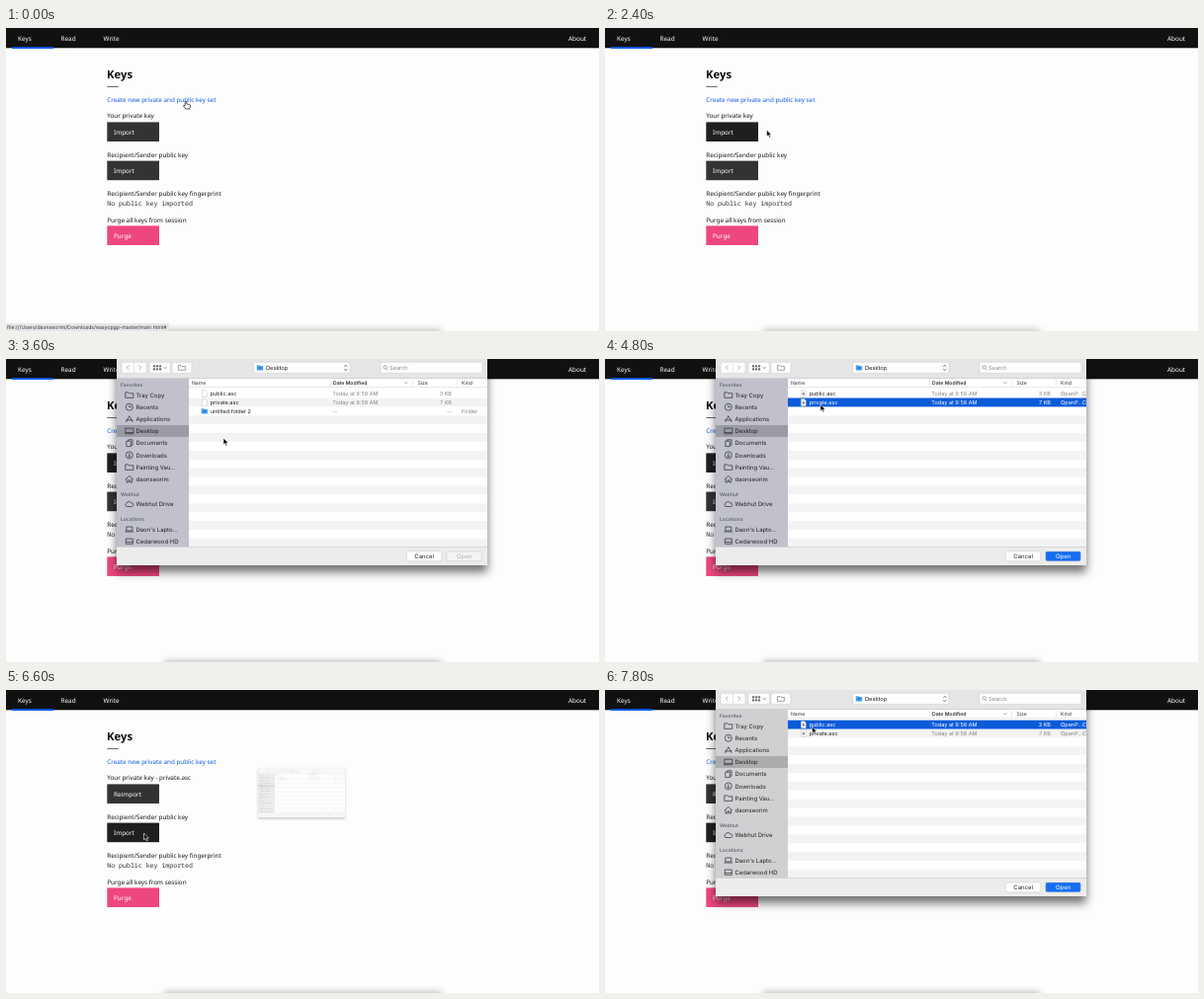
Recreate the animation shown at these times as an HTML page. Size 600 by 307 pixels, loop 8000 ms.

```html
<!DOCTYPE html>
<html lang="en">
<head>
<meta charset="utf-8">
<title>Key import</title>
<style>
html, body { margin: 0; width: 100%; height: 100%; overflow: hidden; background: #fdfdfd; }
svg { display: block; width: 100%; height: 100%; text-rendering: geometricPrecision; }
.page { font: 6.3px "Noto Sans", "Open Sans", sans-serif; }
.ui { font: 5.55px Inter, Roboto, sans-serif; }
.shadow { filter: drop-shadow(0 7px 5px rgba(0, 0, 0, .55)); }
</style>
</head>
<body>
<svg id="stage" viewBox="0 0 600 307"></svg>
<script>
const LOOP = 8000, STEP = 200;
const stage = document.getElementById('stage');
const BLUE = '#0b5bd9', INK = '#3c3d44';

const rect = (x, y, w, h, fill, extra = '') =>
  `<rect x="${x}" y="${y}" width="${w}" height="${h}" fill="${fill}" ${extra}/>`;
const text = (x, y, s, fill = '#161616', extra = '') =>
  `<text x="${x}" y="${y}" fill="${fill}" ${extra}>${s}</text>`;
const line = (d, stroke, width = .7, extra = '') =>
  `<path d="${d}" fill="none" stroke="${stroke}" stroke-width="${width}" ${extra}/>`;
const shape = (d, fill, extra = '') => `<path d="${d}" fill="${fill}" ${extra}/>`;
const at = (x, y, s) => `<g transform="translate(${x} ${y})">${s}</g>`;
const size = n => `font-size="${n}"`;

// Pointer path: time, x, y
const path = [
  [0, 182, 74], [1000, 182, 74], [1400, 152, 102], [1600, 167, 103], [2200, 167, 103],
  [3200, 150, 104], [3400, 216.5, 93], [3600, 220, 80], [4400, 218, 46], [5200, 218, 46],
  [5600, 185, 90], [6000, 139.5, 145], [6600, 139.5, 145], [7600, 209.5, 37], [LOOP, 209.5, 37]
];

function pointerAt(t) {
  const i = path.findIndex(p => p[0] > t);
  const [a, b] = [path[i - 1], path[i]];
  const k = (t - a[0]) / (b[0] - a[0]);
  return [a[1] + (b[1] - a[1]) * k, a[2] + (b[2] - a[2]) * k];
}

function pointer(t) {
  const hand = 'M-.8 .6Q0-.3 .7 .6V3L3.8 3.5Q4.7 3.8 4.5 5L3.8 8H-.2L-2.6 5Q-2.6 4-.8 4.8Z';
  const arrow = 'M0 0V6.8L1.6 5.4L2.7 7.9L3.9 7.4L2.8 5H4.9Z';
  return at(...pointerAt(t), t < 1200
    ? shape(hand, '#fff', 'stroke="#111" stroke-width=".7"')
    : shape(arrow, '#000', 'stroke="#fff" stroke-width=".6"'));
}

const button = (y, label, fill) =>
  rect(102.3, y, 52.7, 19.6, fill) + text(109, y + 12.4, label, '#fff', size(6.4));

function page(t) {
  const loaded = t >= 5600;
  const first = t >= 1400 && !loaded ? '#1f1f1f' : '#333';
  const second = t >= 6000 ? '#1f1f1f' : '#333';
  const nav = [[12, 'Keys'], [55.5, 'Read'], [98.5, 'Write'], [569, 'About']];
  const status = rect(0, 299.3, 165, 8, '#e4e5e7') +
    text(1, 305.3, 'file:///Users/daonseorim/Downloads/easyopgp-master/main.html#', '#333', 'class="ui" style="font-size:5.15px"');
  return rect(0, 0, 600, 307, '#fdfdfd') +
    rect(160, 306, 280, 10, '#000', 'opacity=".28" style="filter:blur(3.5px)"') +
    rect(0, 0, 600, 20.3, '#111') + rect(6, 19.2, 42, 1.8, '#0f62fe') +
    nav.map(([x, s]) => text(x, 13.2, s, '#fff', size(6.4))).join('') +
    text(102, 51, 'Keys', '#111', 'font-size="11.3" font-weight="700"') +
    rect(102.3, 59.2, 11.4, .8, '#444') +
    text(102.3, 75, 'Create new private and public key set', '#0f5be8') +
    text(102.3, 91.4, 'Your private key' + (loaded ? ' - private.asc' : '')) +
    button(95.4, loaded ? 'Reimport' : 'Import', first) +
    text(102.3, 130.8, 'Recipient/Sender public key') +
    button(134.6, 'Import', second) +
    text(102.3, 170.3, 'Recipient/Sender public key fingerprint') +
    text(102.3, 180.1, 'No public key imported', '#333', 'style="font:6.57px \'Noto Sans Mono\',\'DejaVu Sans Mono\',monospace"') +
    text(102.3, 196.6, 'Purge all keys from session') +
    button(200.4, 'Purge', '#ee477f') +
    (t < 1200 ? status : '');
}

// Sidebar icons, centred on 0,0
const icon = {
  folder: 'M-4-2.7H-1L0-1.7H4V2.8H-4Z',
  clock: 'M-3.5 0A3.5 3.5 0 1 1 3.5 0A3.5 3.5 0 1 1-3.5 0M0-2V0H2',
  apps: 'M-3.3 3L0-3.2L3.3 3M-3.8 1H3.8',
  screen: 'M-4-2.8H4V2.8H-4ZM-4 1.5H4',
  pages: 'M-3-2V3.4H1.5V-2ZM-1.2-2V-3.4H3.2V2H1.5',
  down: 'M-3.5 0A3.5 3.5 0 1 1 3.5 0A3.5 3.5 0 1 1-3.5 0M0-2V2M-1.5 .5L0 2L1.5 .5',
  house: 'M-4 .2L0-3.4L4 .2M-2.8-.5V3.2H-.8V1H.8V3.2H2.8V-.5',
  cloud: 'M-2.8 2.3A1.8 1.8 0 0 1-2.8-1A2.6 2.6 0 0 1 2-1.2A1.8 1.8 0 0 1 2.8 2.3Z',
  laptop: 'M-3-2.5H3V1.5H-3ZM-4.5 2.5H4.5',
  disk: 'M-3.5-2.5H3.5V2.7H-3.5ZM-3.5 .8H3.5'
};
const places = [
  [36.5, 'folder', 'Tray Copy'], [48.7, 'clock', 'Recents'], [60.9, 'apps', 'Applications'],
  [73, 'screen', 'Desktop'], [85.2, 'pages', 'Documents'], [97.4, 'down', 'Downloads'],
  [109.6, 'folder', 'Painting Vau...'], [121.8, 'house', 'daonseorim'],
  [147.2, 'cloud', 'Webhut Drive'], [172.5, 'laptop', 'Daon\'s Lapto...'], [184.6, 'disk', 'Cedarwood HD']
];

function sidebar(t) {
  const heads = [[28, 'Favorites'], [138.5, 'Webhut'], [163.8, 'Locations']];
  return rect(112, 19.5, 73, 170.5, t < 6000 ? '#c0c1ca' : '#d0d0d3') +
    rect(112, 67, 73, 12, t < 6000 ? '#9a9ba4' : '#acacaf') +
    heads.map(([y, s]) => text(116, y, s, '#66676f', 'font-size="5" font-weight="600"')).join('') +
    places.map(([y, i, s]) => at(124.8, y, line(icon[i], INK, .8)) +
      text(131.5, y + 2.1, s, '#222', size(5.95))).join('');
}

const blueFolder = (x, y) => at(x, y, shape('M-3.2-2.6H-.6L0-1.9H3.2V2.6H-3.2Z', '#4aa3f2') +
  rect(-1.2, -.9, 2.4, 2.2, '#2478cf'));

function toolbar() {
  const box = (x, w) => rect(x, 3.2, w, 11.2, '#fcfcfc', 'rx="1.6" stroke="#c9c9c9" stroke-width=".5"');
  return rect(112, 0, 375, 19.5, '#e5e4e6') + rect(112, 19, 375, .6, '#c4c4c6') +
    box(117, 25) + box(145, 21.5) + box(168, 20) + box(250.5, 97.5) + box(379, 103) +
    line('M129.5 3.2V14.4', '#d0d0d0', .5) +
    line('M124.5 6.5L122.2 8.8L124.5 11.1M134.5 6.5L136.8 8.8L134.5 11.1', '#999') +
    [0, 3, 6].map(x => rect(149 + x, 6.3, 2.1, 2, '#666') + rect(149 + x, 9.4, 2.1, 2, '#666')).join('') +
    line('M159.8 8.2L161.2 9.6L162.6 8.2', '#666') +
    at(178, 8.9, line(icon.folder, '#666', .7, 'transform="scale(.85)"')) +
    blueFolder(257, 8.9) + text(263, 10.9, 'Desktop', '#222', size(5.7)) +
    line('M342.3 7.7L343.8 6.1L345.3 7.7M342.3 10.1L343.8 11.7L345.3 10.1', '#444') +
    line('M382 8.2A1.7 1.7 0 1 0 385.4 8.2A1.7 1.7 0 1 0 382 8.2M385 9.6L386.4 11.2', '#777', .6) +
    text(388, 10.9, 'Search', '#8c8c8c', size(5.6));
}

function fileRow(row, name, kb, chosen, ready) {
  const y = 35.1 + row * 8.9, ink = chosen ? '#fff' : '#222', pale = chosen ? '#fff' : '#858585';
  return (chosen ? rect(185, y - 4.5, 302, 8.9, BLUE) : '') +
    at(200.8, y, shape('M-2.4-3.4H1L2.4-2V3.4H-2.4Z', '#fff', 'stroke="#bbb" stroke-width=".5"') +
      (ready ? rect(-1, -.4, 2, 1.8, '#777') + line('M-.6-.4V-1.4H.6V-.4', '#777', .5) : '')) +
    text(206.7, y + 2, name, ink) + text(330.3, y + 2, 'Today at 9:58 AM', pale) +
    text(451, y + 2, kb + ' KB', pale, 'text-anchor="end"') +
    (ready ? text(461, y + 2, 'OpenP...C', pale) : '');
}

function table(t, chosen) {
  const ready = t >= 3800;
  let s = rect(185, 19.6, 302, 170.4, '#fff');
  for (let i = 1; i < 18; i += 2) s += rect(185, 30.6 + i * 8.9, 302, 8.9, '#f2f4f4');
  s += rect(185, 28.3, 302, .5, '#d5d5d5');
  for (const x of [328, 411, 456]) s += rect(x, 21, .5, 6.5, '#d5d5d5');
  [[188, 'Name'], [331, 'Date Modified', 600], [416.5, 'Size'], [461, 'Kind']].forEach(([x, h, w = 400]) =>
    s += text(x, 26, h, '#333', `font-size="5.1" font-weight="${w}"`));
  s += line('M403.6 23.4L405 24.8L406.4 23.4', '#666', .6);
  s += fileRow(0, 'public.asc', 3, chosen === 0, ready) + fileRow(1, 'private.asc', 7, chosen === 1, ready);
  if (!ready) s += blueFolder(200.8, 52.9) + text(206.7, 54.9, 'untitled folder 2', '#222') +
    text(330.3, 54.9, '--', '#858585') + text(451, 54.9, '--', '#858585', 'text-anchor="end"') +
    text(461, 54.9, 'Folder', '#858585');
  return s;
}

function dialog(t) {
  const chosen = t >= 7800 ? 0 : t >= 4600 && t < 5600 ? 1 : -1;
  const live = chosen >= 0;
  const push = (x, label, fill, ink) =>
    rect(x, 195, 35.5, 9.8, fill, 'rx="1.7" stroke="#b9b9b9" stroke-width=".4"') +
    text(x + 17.8, 202.1, label, ink, 'font-size="6" text-anchor="middle"');
  return `<clipPath id="edge">${rect(112, 0, 375, 209)}</clipPath>
    <g class="ui"><g class="shadow">${rect(112, -6, 375, 215, '#ececec')}</g>
    <g clip-path="url(#edge)">${sidebar(t) + table(t, chosen) + toolbar()}
    ${rect(112, 190, 375, .6, '#c6c6c6') + push(405.3, 'Cancel', '#fff', '#222') +
      push(445.8, 'Open', live ? '#176df0' : '#f4f4f4', live ? '#fff' : '#b0b0b0')}</g></g>`;
}

function scene(t) {
  let s = page(t);
  if (t >= 3600 && t < 5400 || t >= 6800) s += dialog(t);
  else if (t === 6600) s += `<g opacity=".36" transform="translate(255 80) scale(.235) translate(-112 0)">${dialog(t)}</g>`;
  return `<g class="page">${s}</g>${pointer(t)}`;
}

let shown = -1;
function tick(now) {
  const t = Math.floor(now % LOOP / STEP) * STEP;
  if (t !== shown) stage.innerHTML = scene(shown = t);
  requestAnimationFrame(tick);
}
tick(performance.now());
</script>
</body>
</html>
```
